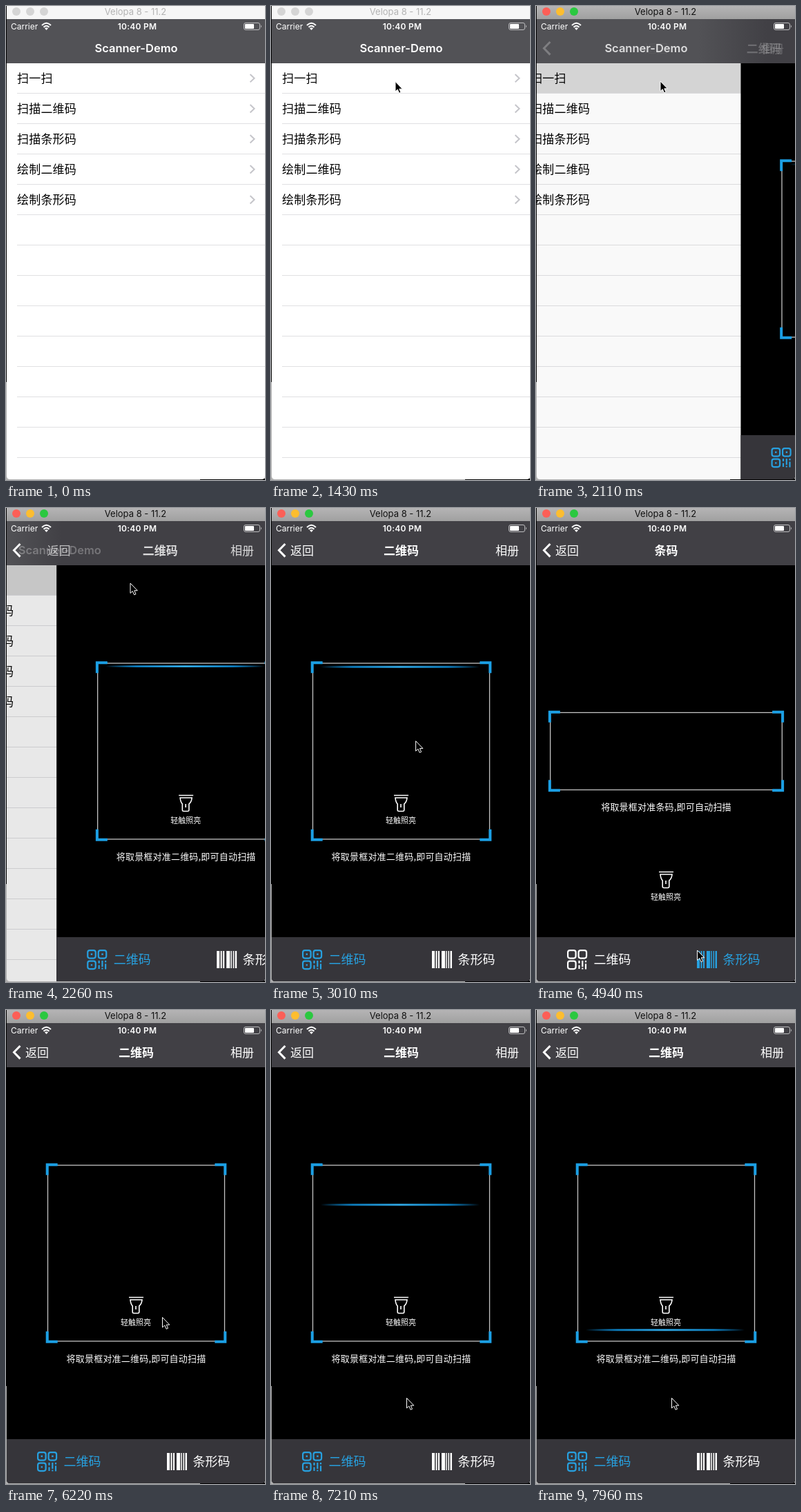
An HTML page that plays this animation: 375 px wide and 687 px high, repeating every 8 s.

```html
<!DOCTYPE html>
<html lang="zh-CN">
<head>
<meta charset="utf-8">
<title>Scanner-Demo</title>
<style>
html, body { margin: 0; width: 100%; height: 100%; overflow: hidden; background: #b0b0b0; }
svg { display: block; }
text { font-family: Inter, 'Noto Sans CJK SC', 'Noto Sans CJK', sans-serif; fill: #fff; }
.cjk { font-family: 'Noto Sans CJK SC', 'Noto Sans CJK', 'Noto Sans', sans-serif; font-size: 17px; }
.mid { text-anchor: middle; }
.bold { font-weight: 600; }
.cell { fill: #000; letter-spacing: .2px; }
.hint { font-size: 13px; letter-spacing: .2px; }
.tab { font-size: 18px; fill: inherit; stroke: none; }
.line { fill: none; stroke: #fff; stroke-width: 1.6; }
</style>
</head>
<body>
<svg width="375" height="687" viewBox="0 0 375 687">
  <defs>
    <clipPath id="window"><path d="M1 0H375V681Q375 686 370 686H6Q1 686 1 681Z"/></clipPath>
    <linearGradient id="activeBar" x2="0" y2="1">
      <stop stop-color="#b5b4b5"/><stop offset="1" stop-color="#a0a0a0"/>
    </linearGradient>
    <linearGradient id="navFill" gradientUnits="userSpaceOnUse" x1="0" x2="120" y1="0" y2="0">
      <stop stop-color="#525256"/><stop offset="1" stop-color="#414045"/>
    </linearGradient>
    <linearGradient id="beamFill">
      <stop stop-color="#0a7fc4" stop-opacity="0"/>
      <stop offset=".2" stop-color="#0d86cc"/>
      <stop offset=".5" stop-color="#35b8fa"/>
      <stop offset=".8" stop-color="#0d86cc"/>
      <stop offset="1" stop-color="#0a7fc4" stop-opacity="0"/>
    </linearGradient>
  </defs>

  <path d="M0 0H1V545H0ZM281 685H375V687H281Z"/>
  <g clip-path="url(#window)">
    <g id="list">
      <rect width="375" height="687" fill="#fff"/>
      <rect id="highlight" y="83" width="375" height="43" fill="#d9d9d9"/>
      <g id="rows"></g>
    </g>
    <rect id="dim" y="83" width="375" height="604"/>

    <g id="scanner">
      <rect x="1" y="83" width="375" height="604"/>
      <rect id="frame" fill="none" stroke="#c4c4c4" stroke-width="1.3"/>
      <path id="corners" fill="none" stroke="#1b9fe4" stroke-width="4"/>
      <g id="beam">
        <rect x="72" y="-1.5" width="230" height="3" rx="1.5" fill="url(#beamFill)" opacity=".8"/>
        <rect x="72" y="-.5" width="230" height="1" fill="url(#beamFill)"/>
      </g>
      <g id="torch">
        <path class="line" d="M178 416.5H199M180 420H197Q196.5 426 192.8 429V437.5Q192.8 439.5 190.8 439.5H185.2Q183.2 439.5 183.2 437.5V429Q180.5 426 180 420ZM188 429V434"/>
        <text class="cjk mid" x="188" y="457" style="font-size:11px">轻触照亮</text>
      </g>
      <text id="hint" class="cjk hint mid" x="188.5"></text>
      <rect x="1" y="622" width="375" height="65" fill="#36353a"/>
      <g id="qrTab">
        <g fill="none" stroke-width="2.2">
          <rect x="46.1" y="641.1" width="11.5" height="11.5" rx="3"/>
          <rect x="61.6" y="641.1" width="11.5" height="11.5" rx="3"/>
          <rect x="46.1" y="656.6" width="11.5" height="11.5" rx="3"/>
          <path d="M62.5 656V660M62.5 662.5V668M67.3 656V665M67.3 666.5V668.5M72 656V658.5M72 660.5V668.5"/>
        </g>
        <path id="dots" stroke-width="2.4" d="M50.6 646.8h2.4M66.2 646.8h2.4M50.6 662.4h2.4"/>
        <text class="cjk tab" x="83.5" y="661">二维码</text>
      </g>
      <g id="barTab">
        <path d="M233 642h4v25h-4zM238.5 642h2v25h-2zM242 642h2v25h-2zM247 642h5v25h-5zM253.2 642h1.5v25h-1.5zM256.5 642h1.5v25h-1.5zM259.5 642h2.5v25h-2.5z"/>
        <text class="cjk tab" x="270.5" y="661">条形码</text>
      </g>
    </g>

    <rect y="19" width="375" height="64" fill="url(#navFill)"/>
    <text x="7" y="33.5" font-size="12">Carrier</text>
    <path class="line" style="stroke-width:2" d="M52 28Q58.5 21.5 65 28M54.5 30.7Q58.5 26.8 62.5 30.7"/>
    <path fill="#fff" d="M56 32.3Q58.5 30 61 32.3L58.5 35Z"/>
    <text class="mid bold" x="190" y="33.5" font-size="12" letter-spacing=".25">10:40 PM</text>
    <rect x="344.5" y="24.5" width="23" height="10" rx="2.5" fill="none" stroke="#bdbdbf"/>
    <rect x="346" y="26" width="13" height="7" rx="1" fill="#fff"/>
    <path d="M369 27.5q2 2 0 4z" fill="#bdbdbf"/>

    <text id="listTitle" class="mid bold" x="188.5" y="67" font-size="16.5">Scanner-Demo</text>
    <path id="backArrow" class="line" style="stroke-width:3" d="M20.5 52L11.5 61.3 20.5 70.6"/>
    <text id="backText" class="cjk" x="28" y="67.5">返回</text>
    <text id="pageTitle" class="cjk mid bold" x="188.5" y="67.5"></text>
    <text id="album" class="cjk" x="325" y="67.5">相册</text>

    <rect id="titleBar" width="375" height="19"/>
    <g id="lights"><circle cx="15" cy="8" r="6"/><circle cx="35" cy="8" r="6"/><circle cx="55" cy="8" r="6"/></g>
    <text id="windowTitle" class="mid" x="187.5" y="13" font-size="13">Velopa 8 - 11.2</text>
  </g>
  <path id="cursor" d="M0 0V14.5L3.3 11.5 5.6 16.8 8 15.8 5.8 10.7H10.3Z" stroke="#fff"/>
</svg>

<script>
const LOOP = 8000;
const el = Object.fromEntries([...document.querySelectorAll('[id]')].map(e => [e.id, e]));
const clamp = v => Math.max(0, Math.min(1, v));
const progress = (t, start, length) => clamp((t - start) / length);
const smooth = p => (1 - Math.cos(Math.PI * p)) / 2;
const mix = (a, b, p) => a + (b - a) * p;
const set = (node, attrs) => { for (const k in attrs) node.setAttribute(k, attrs[k]); };
const fade = (node, opacity) => set(node, { opacity: +opacity });
const shift = (node, x, y = 0) => set(node, { transform: `translate(${x} ${y})` });

const labels = ['扫一扫', '扫描二维码', '扫描条形码', '绘制二维码', '绘制条形码'];
let rows = '';
for (let i = 0; i < 13; i++) {
  const y = 83 + 44 * i;
  rows += `<rect x="16" y="${y + 43}" width="359" height="1" fill="#e0e0e2"/>`;
  if (labels[i]) rows += `<text class="cjk cell" x="16" y="${y + 28}">${labels[i]}</text>
    <path d="M353.5 ${y + 16}l6 5.7-6 5.7" fill="none" stroke="#c5c5ca" stroke-width="2"/>`;
}
el.rows.innerHTML = rows;

// time, x, y
const cursorPath = [
  [0, 390, 275], [520, 378, 275], [1020, 209, 124], [1190, 209, 124], [1430, 180, 109.5],
  [2300, 180, 109], [2720, 205, 300], [2890, 205, 300], [3450, 246.5, 640.5],
  [4630, 246.5, 640.5], [4850, 233.5, 641], [4960, 233.5, 641], [5060, 118, 641],
  [5550, 118, 641], [6040, 235, 430], [6220, 226.5, 445.5], [6860, 196.5, 562.5],
  [7740, 196.5, 562.5], [7840, 196.5, 569], [7950, 196.5, 562.5], [LOOP, 196.5, 562.5]
];
function moveCursor(t) {
  const i = cursorPath.findIndex(k => k[0] > t);
  const [t0, x0, y0] = cursorPath[i - 1], [t1, x1, y1] = cursorPath[i];
  const p = smooth((t - t0) / (t1 - t0));
  shift(el.cursor, mix(x0, x1, p), mix(y0, y1, p));
}

function drawFrame(p) {
  const x = mix(60.5, 20.7, p), y = mix(225, 296.5, p);
  const width = mix(256, 335.6, p), height = mix(255, 112, p);
  set(el.frame, { x, y, width, height });
  const l = x - .8, r = x + width + .8, u = y - .8, d = y + height + .8;
  const corner = (cx, cy, sx, sy) => `M${cx + 15 * sx} ${cy}H${cx}V${cy + 15 * sy}`;
  set(el.corners, { d: corner(l, u, 1, 1) + corner(r, u, -1, 1) + corner(l, d, 1, -1) + corner(r, d, -1, -1) });
}

function drawWindow(t) {
  const active = t >= 1850;
  set(el.titleBar, { fill: active ? 'url(#activeBar)' : '#f6f6f6' });
  el.windowTitle.style.fill = active ? '#111' : '#b3b3b3';
  ['#fc5f57', '#fdbd2f', '#2bc840'].forEach((c, i) => set(el.lights.children[i], { fill: active ? c : '#d5d5d5' }));
  fade(el.highlight, t >= 1900);
}

// Returns how far the scanner page has slid in, 0 to 1.
function drawPush(t) {
  const rest = (1 - progress(t, 2080, 536)) ** 4, p = 1 - rest;
  const edge = 375 * rest;
  shift(el.list, -112.5 * p);
  fade(el.dim, .11 * p);
  shift(el.scanner, edge);
  set(el.navFill, { x1: edge - 70 * Math.min(1, p * 4), x2: edge + 50 * rest });
  shift(el.listTitle, -137 * p);
  fade(el.listTitle, p < 1 ? 1 - p * .9 : 0);
  shift(el.backText, 164 * rest);
  fade(el.backText, p * p);
  shift(el.pageTitle, 180 * rest);
  fade(el.pageTitle, p);
  fade(el.backArrow, clamp(p * 1.2));
  return p;
}

function drawScanner(t, pushed) {
  const barcode = t >= 3870 && t < 5260;
  drawFrame(smooth(progress(t, 3870, 660)) - smooth(progress(t, 5260, 720)));
  el.pageTitle.textContent = barcode ? '条码' : '二维码';
  fade(el.album, barcode ? 0 : pushed);

  const settled = t < 3870 || (t >= 4640 && t < 5260) || t >= 6100;
  fade(el.hint, settled);
  fade(el.torch, settled);
  el.hint.textContent = `将取景框对准${barcode ? '条码' : '二维码'},即可自动扫描`;
  set(el.hint, { y: barcode ? 438 : 510 });
  shift(el.torch, 0, barcode ? 111 : 0);

  const sweepStart = t < 5000 ? 2960 : 6790;
  shift(el.beam, 0, 229.5 + 248 * smooth(progress(t, sweepStart, 1380)));
  fade(el.beam, t < 3870 || t >= 6280);

  const blue = '#27a0df', white = '#fff';
  const qrColor = barcode ? white : blue;
  set(el.qrTab, { fill: qrColor, stroke: qrColor });
  set(el.barTab, { fill: barcode ? blue : white });
  fade(el.dots, !barcode);
}

const origin = performance.now();
function tick() {
  const t = (performance.now() - origin) % LOOP;
  drawWindow(t);
  drawScanner(t, drawPush(t));
  moveCursor(t);
  requestAnimationFrame(tick);
}
tick();
</script>
</body>
</html>
```
